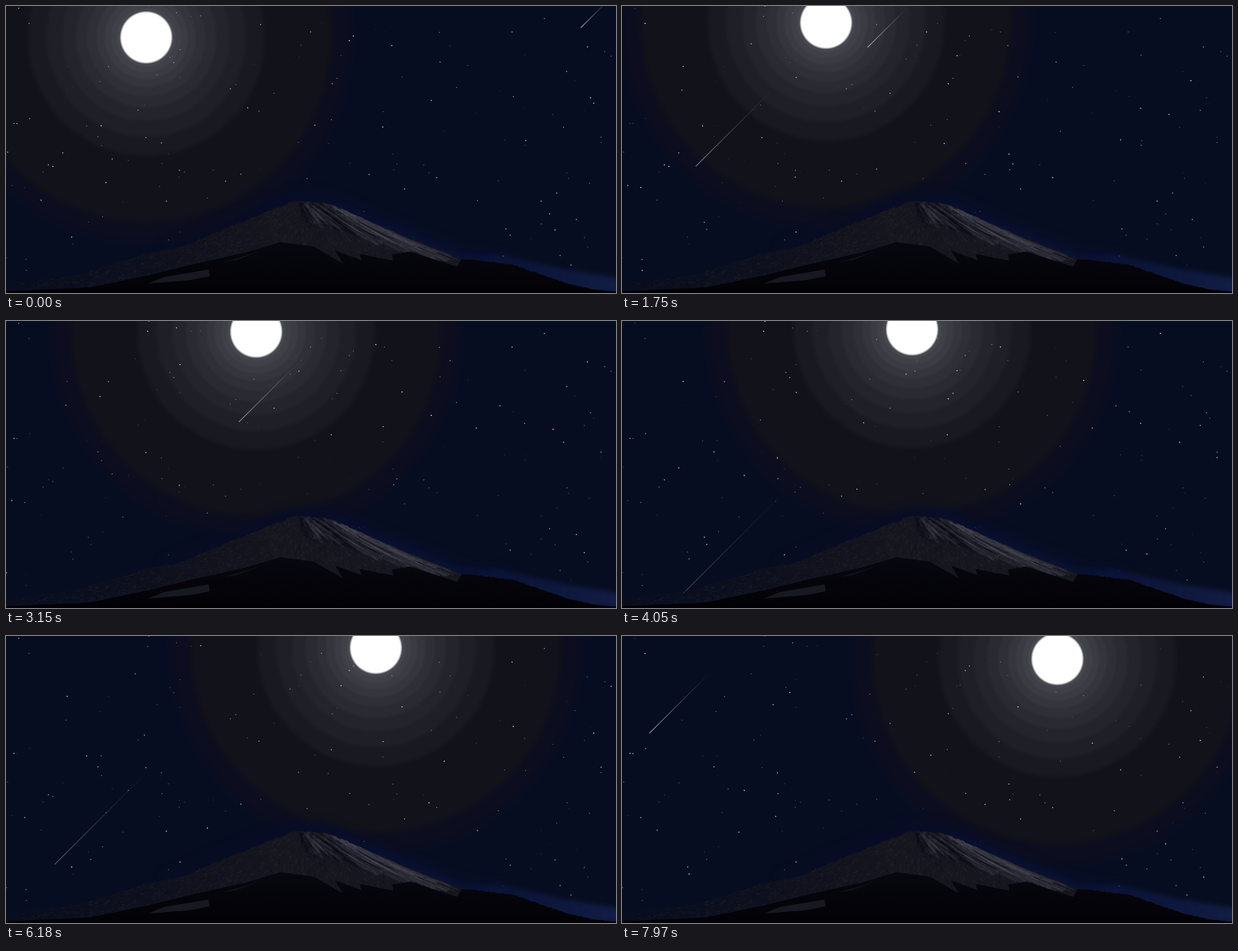
These frames come from a looping animation (1090 by 514 pixels, 8 s). An HTML page with a canvas:

```html
<!DOCTYPE html>
<html lang="en">
<head>
<meta charset="utf-8">
<title>Moonlit mountain</title>
<style>
  html, body { margin: 0; width: 100%; height: 100%; overflow: hidden; background: #070d21; }
  canvas { display: block; }
</style>
</head>
<body>
<canvas id="sky" width="1090" height="514"></canvas>
<script>
const W = 1090, H = 514, LOOP = 8000, FIRST = 150, STEP = 177.5;
const ctx = document.getElementById('sky').getContext('2d');

function seeded(seed) {
  return () => {
    seed = (seed + 0x6D2B79F5) | 0;
    let t = Math.imul(seed ^ (seed >>> 15), 1 | seed);
    t = (t + Math.imul(t ^ (t >>> 7), 61 | t)) ^ t;
    return ((t ^ (t >>> 14)) >>> 0) / 4294967296;
  };
}

const hash = (a, b) => {
  const v = Math.sin(a * 12.9898 + b * 78.233) * 43758.5453;
  return v - Math.floor(v);
};
const gray = v => `rgb(${v},${v},${v + 8})`;

// Heights between a few key points
function heightAt(points, x) {
  let i = 1;
  while (i < points.length - 1 && points[i][0] < x) i++;
  const [x0, y0] = points[i - 1], [x1, y1] = points[i];
  return y0 + (y1 - y0) * (x - x0) / (x1 - x0);
}

const ridge = [
  [0, 497], [130, 481], [255, 443], [310, 432], [370, 408], [470, 367], [515, 350],
  [575, 352], [650, 386], [812, 452], [905, 463], [1000, 496], [1050, 508], [W, 512]
];

// Moon on a wide arc
const arc = { x: 543.6, top: 14.7, r: 1053, from: -0.282, rate: 6.363e-5 };
function moonAt(t) {
  const a = arc.from + arc.rate * t;
  return [arc.x + arc.r * Math.sin(a), arc.top + arc.r * (1 - Math.cos(a))];
}

function disc(x, y, r, fill) {
  ctx.fillStyle = fill;
  ctx.beginPath();
  ctx.arc(x, y, r, 0, Math.PI * 2);
  ctx.fill();
}

// Banded halo: each ring ramps quickly to its own tone, then stays flat.
const rings = [[376, '#0c0d1e'], [340, gray(18)]];
for (let i = 0; i < 9; i++) rings.push([217 * 0.84 ** i, gray(Math.round(25 + i * 5.6))]);

function drawHalo(x, y) {
  const reach = rings[0][0];
  const g = ctx.createRadialGradient(x, y, 0, x, y, reach);
  let outer = 'rgba(12,13,30,0)';
  for (const [r, color] of rings) {
    g.addColorStop(r / reach, outer);
    g.addColorStop(r * 0.95 / reach, color);
    outer = color;
  }
  disc(x, y, reach, g);
}

function drawMoon(x, y) {
  const g = ctx.createRadialGradient(x, y, 44, x, y, 48);
  g.addColorStop(0, '#fff');
  g.addColorStop(0.5, 'rgba(200,200,205,.75)');
  g.addColorStop(1, 'rgba(90,90,100,0)');
  disc(x, y, 48, g);
}

const scatter = seeded(41);
const stars = [];
while (stars.length < 150) {
  const x = scatter() * W, y = scatter() * 490;
  if (y < heightAt(ridge, x) - 6) stars.push([x, y]);
}

function drawStars(step) {
  stars.forEach(([x, y], i) => {
    const glow = hash(i + 1, step + 3);
    ctx.globalAlpha = 0.25 + 0.7 * glow;
    disc(x, y, 0.5 + 0.5 * glow, '#fff');
  });
  ctx.globalAlpha = 1;
}

// Place of entry, start in ms, fall in px per ms
const meteors = [
  [1066, -135, 0.288], [419, 750, 0.288], [513, 1562, 0.4], [597, 2362, 0.288],
  [652, 4074, 0.288], [496, 4765, 0.288], [25, 6700, 0.288], [223, 7355, 0.288]
];

function drawMeteors(t) {
  ctx.lineWidth = 1.2;
  for (const [entry, start, fall] of meteors) {
    const y = (t - start) * fall;
    if (y <= 0 || y > H) continue;
    const x = entry - y, len = 8 * Math.sqrt(y);
    const g = ctx.createLinearGradient(x, y, x + len, y - len);
    g.addColorStop(0, 'rgba(240,240,240,.9)');
    g.addColorStop(1, 'rgba(150,150,160,.03)');
    ctx.globalAlpha = 1 - y / 750;
    ctx.strokeStyle = g;
    ctx.beginPath();
    ctx.moveTo(x, y);
    ctx.lineTo(x + len, y - len);
    ctx.stroke();
  }
  ctx.globalAlpha = 1;
}

function fade(c, x0, y0, x1, y1, ...colors) {
  const g = c.createLinearGradient(x0, y0, x1, y1);
  colors.forEach((color, i) => g.addColorStop(i / (colors.length - 1), color));
  return g;
}

function shape(points) {
  const path = new Path2D();
  points.forEach(([x, y]) => path.lineTo(x, y));
  return path;
}

function paintMountain() {
  const layer = document.createElement('canvas');
  layer.width = W;
  layer.height = H;
  const c = layer.getContext('2d');
  const rnd = seeded(7);

  const outline = (from, to, lift, rough) => {
    const points = [];
    for (let x = from; x <= to; x += 3) points.push([x, heightAt(ridge, x) - lift + (rnd() - 0.5) * rough]);
    return points;
  };
  const floor = [[W, H], [0, H]];

  // Blue air around the slopes
  c.filter = 'blur(8px)';
  c.lineWidth = 34;
  c.strokeStyle = fade(c, 270, 0, 900, 0, 'rgba(7,12,36,0)', 'rgba(7,12,38,.85)', 'rgba(9,16,46,.8)', 'rgba(9,17,50,.4)');
  c.stroke(shape(outline(270, 900, 0, 0)));
  c.filter = 'blur(4px)';
  c.fillStyle = fade(c, 590, 0, W, 0, 'rgba(9,17,52,.3)', 'rgba(10,20,58,.8)', '#121d45');
  c.fill(shape([...outline(590, 840, 8, 0), [880, 445], [1000, 472], [W + 9, 488], [W + 9, H], [590, H]]));
  c.filter = 'none';

  c.fillStyle = fade(c, 0, 0, 480, 0, 'rgba(14,15,26,.3)', 'rgba(17,18,28,.7)', gray(22));
  c.fill(shape([...outline(0, W, 0, 4), ...floor]));

  // Forest below a snow line with a few tongues
  const snowLine = [
    [0, 511], [150, 504], [260, 481], [320, 466], [430, 441], [490, 423], [550, 431],
    [602, 461], [588, 438], [635, 455], [632, 444], [692, 456], [690, 445], [722, 440],
    [806, 467], [814, 453]
  ];
  const forest = shape([...snowLine, ...outline(816, W, 0, 1.5), ...floor]);

  // Gullies fan out from the crater down the right face
  c.save();
  c.clip(shape([...outline(0, 812, 0, 3), ...[...snowLine].reverse()]));
  for (let i = 0; i < 170; i++) {
    const f = rnd(), x = 522 + 66 * f, end = 535 + 275 * f ** 1.2;
    const y = heightAt(ridge, x), drop = heightAt(ridge, end) + 30 * (1 - f) + rnd() * 22;
    const from = rnd() * 0.5;
    const lit = rnd() < 0.3 + 0.3 * f;
    c.strokeStyle = lit ? `rgba(82,82,94,${0.12 + 0.18 * f})` : 'rgba(10,10,18,.28)';
    c.lineWidth = 1 + rnd() * 4;
    c.beginPath();
    c.moveTo(x + (end - x) * from, y + (drop - y) * from);
    c.quadraticCurveTo(x + (end - x) * 0.6, y + (drop - y) * 0.68, end, drop);
    c.stroke();
  }

  // Grain running down both sides
  for (let i = 0; i < 3200; i++) {
    const x = 30 + rnd() * 785, y = heightAt(ridge, x) + rnd() * 80;
    const a = Math.atan2(y - 325, x - 540) + (rnd() - 0.5) * 0.7;
    const len = 2 + rnd() * 6;
    c.lineWidth = 0.6 + rnd();
    c.strokeStyle = rnd() < 0.5 ? 'rgba(110,110,125,.09)' : 'rgba(5,6,18,.18)';
    c.stroke(shape([[x, y], [x + Math.cos(a) * len, y + Math.sin(a) * len]]));
  }
  c.restore();

  c.fillStyle = fade(c, 0, 425, 0, H, '#07070f', '#04040a', '#020206');
  c.fill(forest);

  // Pale clearings
  c.fillStyle = gray(24);
  c.fill(shape([[254, 497], [284, 485], [362, 472], [364, 484], [330, 491]]));
  c.fillStyle = gray(17);
  c.fill(shape([[388, 459], [458, 438], [412, 455]]));
  c.fillStyle = '#010103';
  c.fillRect(0, 511, W, 3);
  return layer;
}

const mountain = paintMountain();

function draw(step) {
  const t = step ? FIRST + (step - 1) * STEP : 0;
  const [x, y] = moonAt(t);
  ctx.fillStyle = '#070d21';
  ctx.fillRect(0, 0, W, H);
  drawHalo(x, y);
  drawStars(step);
  drawMoon(x, y);
  drawMeteors(t);
  ctx.drawImage(mountain, 0, 0);
}

// The picture holds still between steps.
let shown = -1;
const began = performance.now();
function tick() {
  const t = (performance.now() - began) % LOOP;
  const step = t < FIRST ? 0 : 1 + Math.floor((t - FIRST + 12) / STEP);
  if (step !== shown) draw(shown = step);
  requestAnimationFrame(tick);
}
tick();
</script>
</body>
</html>
```
